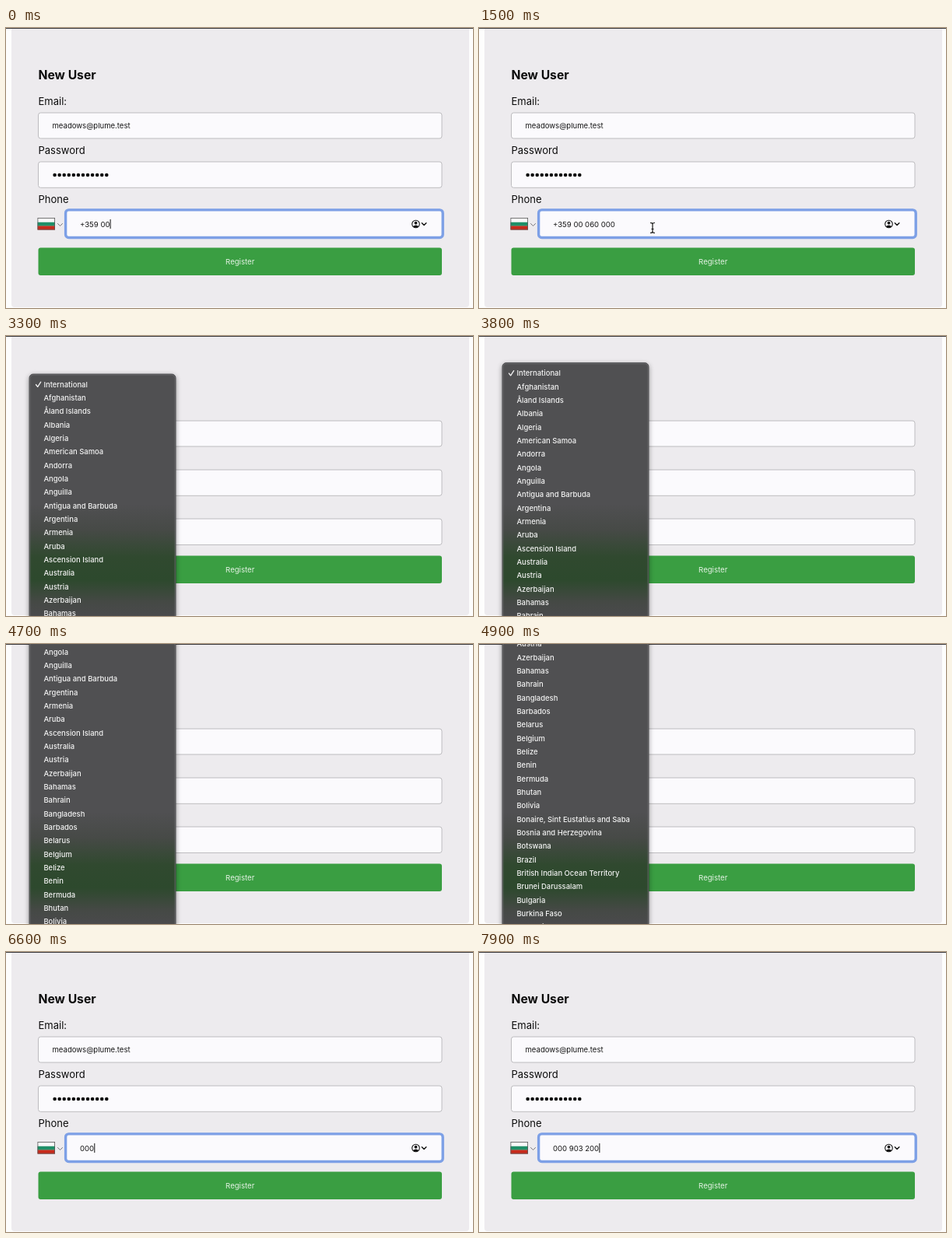
An HTML page for the animation above (8000 ms loop, 600 by 360 pixels).

```html
<!DOCTYPE html>
<html lang="en">
<head>
<meta charset="utf-8">
<title>New User</title>
<style>
  html, body { margin: 0; width: 100%; height: 100%; overflow: hidden; background: #fdfdfd; }
  svg { display: block; width: 600px; height: 360px; font-family: Inter, "Open Sans", sans-serif; }
  text { white-space: pre; }
  .label { font-size: 13px; fill: #0c0c0c; }
  .value { font-size: 9.55px; fill: #161616; }
  .box { fill: #fbfafd; stroke: #bdbcbf; }
  .line { fill: none; stroke: #111; stroke-linecap: round; stroke-linejoin: round; }
  #rows text { font-size: 9.45px; font-weight: 500; fill: #f3f3f3; }
  #panel { filter: drop-shadow(0 2px 3px rgba(0, 0, 0, .4)); }
</style>
</head>
<body>
<svg viewBox="0 0 600 360">
  <defs>
    <linearGradient id="glass" gradientUnits="userSpaceOnUse" x1="0" y1="0" x2="0" y2="360">
      <stop offset="0" stop-color="#505052"/>
      <stop offset=".6" stop-color="#505052"/>
      <stop offset=".69" stop-color="#474a47"/>
      <stop offset=".79" stop-color="#30492f"/>
      <stop offset=".87" stop-color="#2d492d"/>
      <stop offset=".95" stop-color="#454945"/>
      <stop offset="1" stop-color="#4a4a4c"/>
    </linearGradient>
  </defs>

  <path d="M7 0H595V355a4 4 0 0 1-4 4H11a4 4 0 0 1-4-4Z" fill="#edebee"/>
  <rect width="600" height="1" fill="#3c3b3e"/>

  <text x="41.5" y="66" font-size="15.7" font-weight="700" fill="#0c0c0c">New User</text>
  <text class="label" x="41.5" y="99">Email:</text>
  <text class="label" x="41.5" y="162">Password</text>
  <text class="label" x="41.5" y="225">Phone</text>

  <rect class="box" x="41.5" y="109" width="518.5" height="33" rx="3"/>
  <text class="value" x="59.5" y="129.4">meadows@plume.test</text>
  <rect class="box" x="41.5" y="172" width="518.5" height="33.3" rx="3"/>
  <g id="dots" fill="#0c0c0c"></g>

  <g id="flag">
    <rect x="40.5" y="244" width="22.5" height="15.5" fill="#fafafa"/>
    <rect x="40.5" y="249.7" width="22.5" height="5" fill="#1f9068"/>
    <rect x="40.5" y="254.5" width="22.5" height="5" fill="#c92a1c"/>
    <rect x="40.9" y="244.4" width="21.7" height="14.7" fill="none" stroke="#555" stroke-width=".8"/>
  </g>
  <g id="globe" class="line" stroke-width=".8">
    <circle cx="52" cy="252" r="7"/>
    <ellipse cx="52" cy="252" rx="3" ry="7"/>
    <path d="M45 252h14"/>
  </g>
  <path class="line" d="M66.5 251.5l3 3 3-3" style="stroke:#77767a"/>

  <rect class="box" x="78" y="235" width="482" height="33.5" rx="3"/>
  <g id="focus">
    <rect x="76.6" y="233.9" width="484.6" height="35.6" rx="4" fill="#fbfafd" stroke="#7da0e6" stroke-width="3.4"/>
    <circle class="line" cx="526.5" cy="252" r="4.8" stroke-width="1.1"/>
    <circle cx="526.5" cy="250.7" r="1.9" fill="#111"/>
    <path d="M522.8 255.2q3.7-3.4 7.4 0q-3.7 3.2-7.4 0Z" fill="#111"/>
    <path class="line" d="M534.3 250.8l2.8 2.8 2.8-2.8" stroke-width="1.4"/>
  </g>
  <text id="hint" class="value" x="95" y="255.7" style="fill:#aaa9ad">Enter phone number</text>
  <text id="phone" class="value" x="95" y="255.7"></text>
  <rect id="caret" y="246" width="1" height="12" fill="#111"/>

  <rect x="41.5" y="282.5" width="518.5" height="35.5" rx="3" fill="#3a9e42"/>
  <text x="300.7" y="304.3" font-size="9.6" text-anchor="middle" fill="#e6f3e6">Register</text>

  <g id="menu">
    <rect id="panel" x="30" width="188" height="1000" rx="5" fill="url(#glass)" stroke="#3c3c3e" stroke-width=".8"/>
    <rect id="edge" x="30.9" width="186.2" height="1000" rx="4.4" fill="none" stroke="#78787a" stroke-width=".7"/>
    <rect id="mark" x="34.5" y="244.2" width="179.5" height="17.4" rx="3.5" fill="#3f80e8"/>
    <g id="rows">
      <path class="line" d="M38.5 235.8l2.2 2.8 4-6.2" style="stroke:#f3f3f3" stroke-width="1.3"/>
    </g>
  </g>

  <g id="beam" fill="none">
    <path d="M-3-6.5q3 0 3 1.5q0-1.5 3-1.5M0-5V5M-3 6.5q3 0 3-1.5q0 1.5 3 1.5M-1.5 1.5h3" stroke="#fff" stroke-width="2.6"/>
    <path d="M-3-6.5q3 0 3 1.5q0-1.5 3-1.5M0-5V5M-3 6.5q3 0 3-1.5q0 1.5 3 1.5M-1.5 1.5h3" stroke="#111" stroke-width="1.2"/>
  </g>
  <path id="arrow" d="M0 0V12.2L2.8 9.6 4.7 14 6.8 13.1 4.9 8.9H8.8Z" fill="#000" stroke="#fff" stroke-width=".9"/>
</svg>

<script>
const LOOP = 8000, ROW = 17.33;
const $ = id => document.getElementById(id);
const NS = 'http://www.w3.org/2000/svg';

function add(parent, tag, attrs, text = '') {
  const el = document.createElementNS(NS, tag);
  for (const k in attrs) el.setAttribute(k, attrs[k]);
  el.textContent = text;
  parent.append(el);
}

for (let i = 0; i < 12; i++) add($('dots'), 'circle', { cx: 62.6 + i * 6.06, cy: 189, r: 2.3 });

const countries = `International|Afghanistan|Åland Islands|Albania|Algeria|American Samoa|Andorra|Angola|Anguilla|Antigua and Barbuda|Argentina|Armenia|Aruba|Ascension Island|Australia|Austria|Azerbaijan|Bahamas|Bahrain|Bangladesh|Barbados|Belarus|Belgium|Belize|Benin|Bermuda|Bhutan|Bolivia|Bonaire, Sint Eustatius and Saba|Bosnia and Herzegovina|Botswana|Brazil|British Indian Ocean Territory|Brunei Darussalam|Bulgaria|Burkina Faso|Burundi|Cambodia|Cameroon|Canada|Cape Verde|Cayman Islands`.split('|');
countries.forEach((name, i) => add($('rows'), 'text', { x: 48.4, y: 239 + i * ROW }, name));

// [time, number, characters typed]
const intl = '+359 00 060 000', local = '000 903 200';
const typing = [
  [0, intl, 7], [130, intl, 9], [280, intl, 10], [430, intl, 11],
  [580, intl, 13], [730, intl, 14], [870, intl, 15], [1700, '', 0],
  [5350, '', 0], [5900, local, 1], [6200, local, 2], [6480, local, 3],
  [6900, local, 5], [7100, local, 6], [7300, local, 7],
  [7500, local, 9], [7660, local, 10], [7800, local, 11]
];

// [time, rows scrolled]
const scroll = [[2750, 0], [3250, 10], [3650, 10], [4500, 20], [4700, 20], [5030, 33]];

// [time, x, y]
const pointer = [
  [1050, 262, 268], [1400, 223, 257], [1800, 223, 257], [2150, 54, 254], [2600, 47.8, 251],
  [5200, 47.8, 251], [5420, 162, 254]
];

const ease = u => u * u * (3 - 2 * u);

function at(track, t, col) {
  const i = track.findIndex(k => k[0] > t);
  if (i < 0) return track[track.length - 1][col];
  if (i === 0) return track[0][col];
  const a = track[i - 1], b = track[i];
  return a[col] + (b[col] - a[col]) * ease((t - a[0]) / (b[0] - a[0]));
}

const within = (t, a, b) => t >= a && t < b;
const show = (id, on) => { $(id).style.display = on ? '' : 'none'; };

function draw(t) {
  const [since, number, count] = typing.filter(s => s[0] <= t).pop();
  const value = number.slice(0, count);
  const open = within(t, 2300, 5200);
  const focused = t < 2200 || t >= 5350;

  if ($('phone').textContent !== value) $('phone').textContent = value;
  show('hint', !value);
  show('focus', focused);
  show('caret', focused && (t - since) % 1000 < 500);
  const width = value ? $('phone').getComputedTextLength() : 0;
  $('caret').setAttribute('x', 95.2 + width);

  const noCountry = within(t, 1700, 5200);
  show('flag', !noCountry);
  show('globe', noCountry);

  show('menu', open);
  show('mark', within(t, 2450, 2760) || within(t, 5040, 5200));
  const shift = at(scroll, t, 1) * ROW;
  $('panel').setAttribute('y', 222.3 - shift);
  $('edge').setAttribute('y', 223.2 - shift);
  $('rows').setAttribute('transform', `translate(0 ${-shift})`);

  const x = at(pointer, t, 1), y = at(pointer, t, 2);
  const moving = within(t, 1050, 2760) || within(t, 5040, 5900);
  const overText = x > 80;
  for (const id of ['beam', 'arrow']) {
    show(id, moving && overText === (id === 'beam'));
    $(id).setAttribute('transform', `translate(${x} ${y})`);
  }
}

const start = performance.now();
function tick() {
  draw((performance.now() - start) % LOOP);
  requestAnimationFrame(tick);
}
tick();
</script>
</body>
</html>
```
